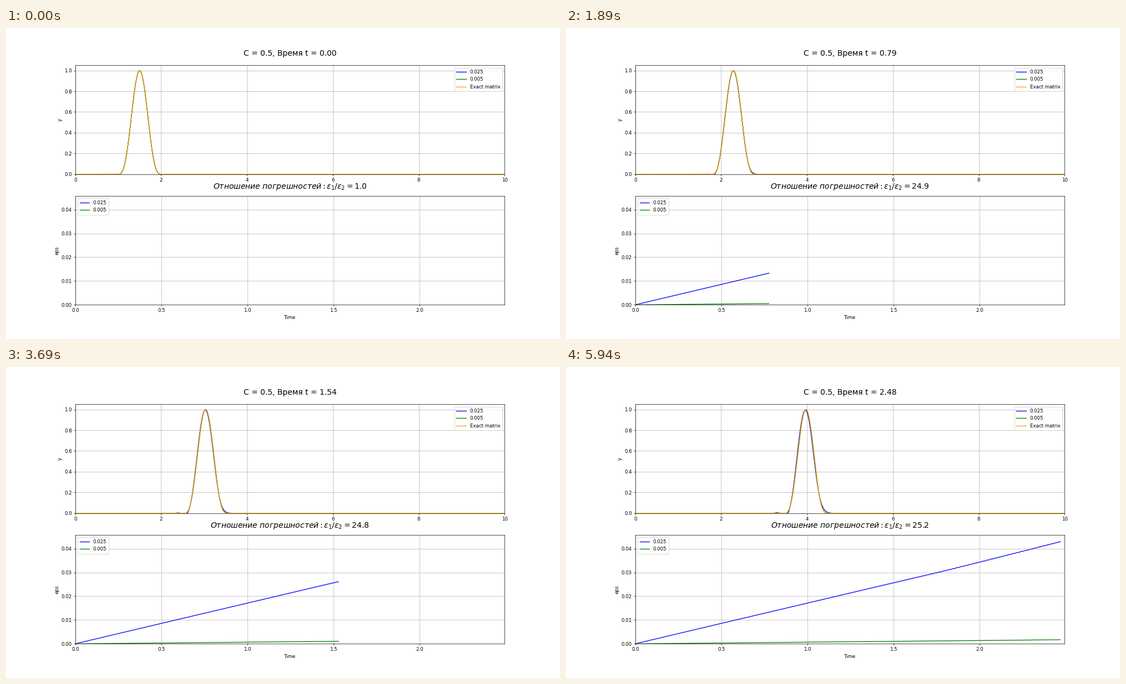
Animation of 998x561 px, one loop 5.97 s. Source, as a matplotlib script:

```python
import numpy as np
import matplotlib.pyplot as plt
from matplotlib.animation import FuncAnimation

DPI = 62.375
FRAMES = 199
C, LENGTH = 0.5, 10
STEPS = (0.025, 0.005)
COLORS = ("blue", "green")
TAU = C * STEPS[0]
T_END = 199.5 * TAU


def pulse(x, t):
    """Exact solution: a sin^3 hump on [1, 2] carried at unit speed."""
    s = x - t - 1
    return np.where((s > 0) & (s < 1), np.sin(np.pi * s) ** 3, 0.0)


def solve(h):
    """Lax-Wendroff run: grid, one profile per frame and its max error."""
    x = np.linspace(0, LENGTH, round(LENGTH / h) + 1)
    u = pulse(x, 0)
    substeps = round(STEPS[0] / h)
    profiles, errors = [], []
    for i in range(FRAMES):
        profiles.append(u.copy())
        errors.append(np.abs(u - pulse(x, i * TAU)).max())
        for _ in range(substeps):
            left, mid, right = u[:-2], u[1:-1], u[2:]
            u[1:-1] = (mid - C / 2 * (right - left)
                       + C ** 2 / 2 * (right - 2 * mid + left))
    return x, profiles, np.array(errors)


runs = [solve(h) for h in STEPS]
times = np.linspace(0, T_END, FRAMES + 1)

fig, (top, low) = plt.subplots(2, 1, figsize=(998 / DPI, 561 / DPI), dpi=DPI)

waves = [top.plot([], [], color=c, label=str(h))[0]
         for c, h in zip(COLORS, STEPS)]
exact, = top.plot([], [], color="orange", label="Exact matrix")
errs = [low.plot([], [], color=c, label=str(h))[0]
        for c, h in zip(COLORS, STEPS)]

top.set(xlim=(0, LENGTH), ylim=(0, 1.05), ylabel="y")
low.set(xlim=(0, T_END), ylim=(0, 0.04576), xlabel="Time", ylabel="eps")
top.legend(loc="upper right")
low.legend(loc="upper left")
for ax in (top, low):
    ax.grid()
head = top.set_title("", fontsize=16, pad=20)
ratio_text = low.set_title("", fontsize=16, pad=15)


def update(i):
    for (x, profiles, errors), wave, err in zip(runs, waves, errs):
        wave.set_data(x, profiles[i])
        err.set_data(times[:i], errors[:i])
    fine = runs[1][0]
    exact.set_data(fine, pulse(fine, i * TAU))

    ratio = runs[0][2][i] / runs[1][2][i] if i else 1.0
    head.set_text(f"C = {C}, Время t = {i * TAU:.2f}")
    ratio_text.set_text(r"$Отношение\ погрешностей: \varepsilon_1/\varepsilon_2"
                        f" = {ratio:.1f}$")
    return [*waves, exact, *errs, head, ratio_text]


anim = FuncAnimation(fig, update, frames=FRAMES, interval=30, repeat=True)
plt.show()
```
